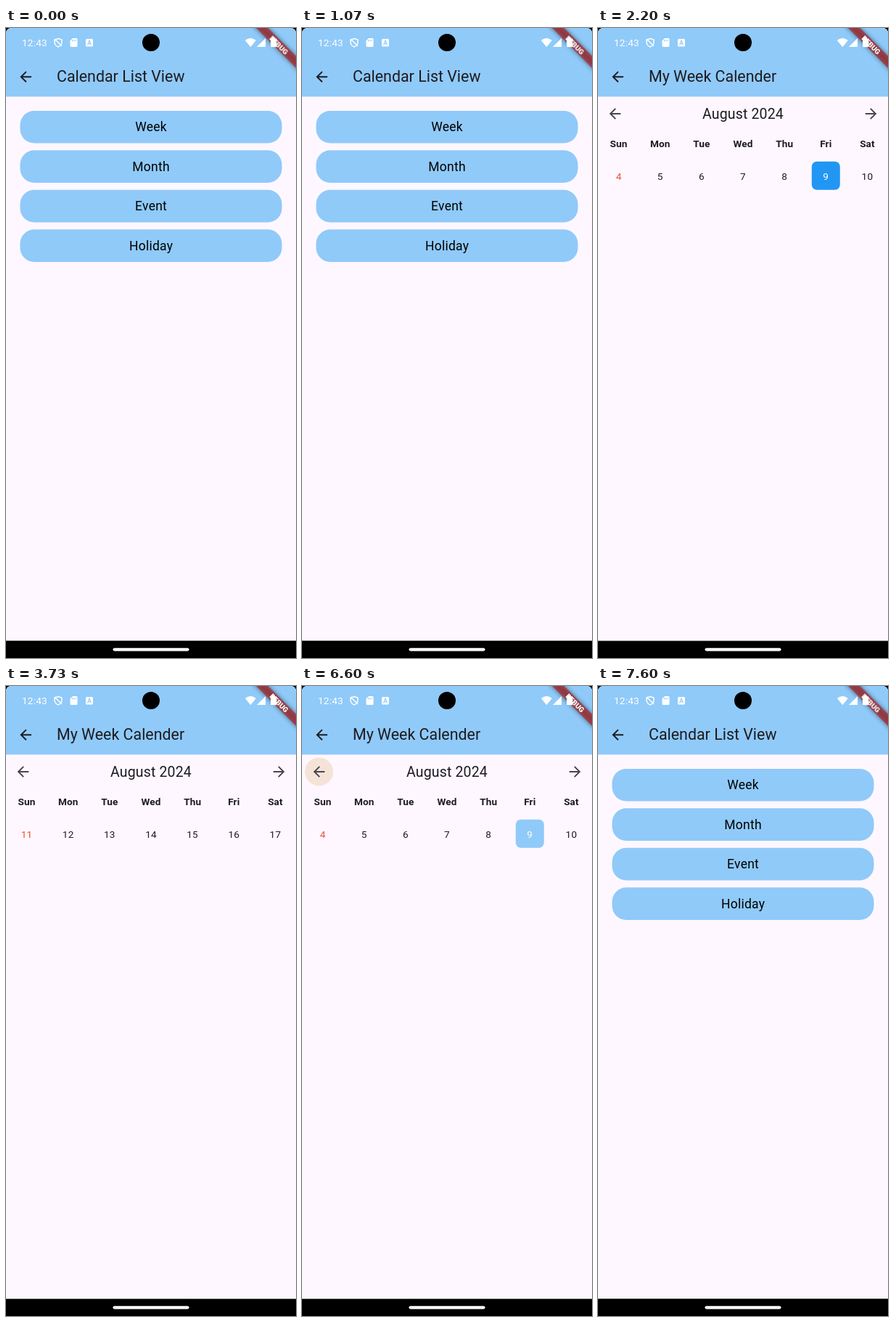
An HTML page that plays this animation: 400x867 px, repeating every 8000 ms.

```html
<!DOCTYPE html>
<html lang="en">
<head>
<meta charset="utf-8">
<title>Calendar list</title>
<style>
  html, body { margin: 0; width: 100%; height: 100%; overflow: hidden; background: #000; }
  svg { display: block; width: 100vw; height: 100vh; }
  text { font-family: Roboto, "Noto Sans", sans-serif; fill: #1d1b20; }
  .mid { text-anchor: middle; }
  .title { font-size: 21.4px; }
  .label { font-size: 17.5px; letter-spacing: .24px; fill: #000; }
  .month { font-size: 19.5px; letter-spacing: .15px; }
  .day { font-size: 13.6px; font-weight: 700; letter-spacing: .1px; }
  .date { font-size: 13.6px; letter-spacing: .2px; }
  .sun { fill: #f04c36; }
  .on, .white { fill: #fff; }
</style>
</head>
<body>
<svg id="stage" viewBox="0 0 400 867">
  <defs>
    <path id="arrow" transform="scale(.973) translate(-12 -12)"
      d="M20 11H7.83l5.59-5.59L12 4l-8 8 8 8 1.41-1.41L7.83 13H20z"/>
    <filter id="soft" x="-20%" y="-100%" width="140%" height="300%"><feGaussianBlur stdDeviation="3"/></filter>
    <clipPath id="app"><path d="M0 843.330V8Q0 0 8 0H392Q400 0 400 8V843.330Z"/></clipPath>
  </defs>
  <rect width="400" height="867"/>
  <g clip-path="url(#app)">
    <g id="list"></g>
    <rect id="scrim" width="400" height="844" opacity="0"/>
    <g id="week"></g>
    <g transform="translate(400 0) rotate(45)">
      <rect x="-48" y="27.2" width="96" height="11.7" opacity=".5" filter="url(#soft)"/>
      <rect x="-48" y="27.2" width="96" height="11.7" fill="#b71c1c" opacity=".63"/>
      <text class="mid white" y="36.6" font-size="9.9" font-weight="900">DEBUG</text>
    </g>
  </g>
  <circle cx="200" cy="20" r="12"/>
  <g fill="#fff">
    <text class="white" x="22" y="25" font-size="13.6" letter-spacing=".2">12:43</text>
    <path d="M72 14.5L77 16.3V20Q76.5 24 72 26Q67.5 24 67 20V16.3ZM67 15L77 25" fill="none" stroke="#fff" stroke-width="1.5"/>
    <path d="M92 14H97Q98.5 14 98.5 15.5V24.5Q98.5 26 97 26H90Q88.5 26 88.5 24.5V17.5Z"/>
    <path d="M91.5 16V18.5M93.7 16V18.5M95.9 16V18.5" stroke="#90caf9"/>
    <rect x="110" y="15" width="10" height="10.5" rx="1.5"/>
    <path d="M112.5 23.5L115 17L117.5 23.5M113.5 21.5H116.5" fill="none" stroke="#90caf9" stroke-width="1.1"/>
    <path d="M329.8 17Q337.3 11 344.8 17L337.3 26.3Z"/>
    <path d="M346 26L358 14V26Z"/>
    <path d="M367 14.3V13H371V14.3H372.3Q373.3 14.3 373.3 15.3V25Q373.3 26.2 372.3 26.2H366Q365 26.2 365 25V15.3Q365 14.3 366 14.3Z"/>
  </g>
  <rect x="147.5" y="853.2" width="105" height="4.2" rx="2.1" fill="#fff"/>
</svg>
<script>
const LOOP = 8000, SKY = '#90caf9', BLUE = '#2196f3', PAPER = '#fef7ff', TAP = '#f5e3d8';
const OPEN = 1695, CLOSE = 7260, ROUTE = 300;
const NEXT = 2800, PREV = 5900, SLIDE = 300;

const $ = id => document.getElementById(id);
const clamp = v => Math.max(0, Math.min(1, v));
const part = (v, from, to) => clamp((v - from) / (to - from));
const mix = (a, b, p) => a + (b - a) * p;
const set = (id, name, value) => $(id).setAttribute(name, value);

function bezier(x1, y1, x2, y2) {
  const at = (a, b, u) => 3 * (1 - u) * (1 - u) * u * a + 3 * (1 - u) * u * u * b + u * u * u;
  return x => {
    if (x <= 0 || x >= 1) return clamp(x);
    let lo = 0, hi = 1;
    for (let i = 0; i < 22; i++) {
      const u = (lo + hi) / 2;
      if (at(x1, x2, u) < x) lo = u; else hi = u;
    }
    return at(y1, y2, lo);
  };
}
const ease = bezier(.42, 0, .58, 1);
const rise = bezier(.05, 0, .133333, .06);
const settle = bezier(.208333, .82, .25, 1);
const zoom = p => p < 1 / 6 ? .4 * rise(p * 6) : .4 + .6 * settle((p - 1 / 6) * 1.2);

const text = (cls, x, y, str) => `<text class="${cls}" x="${x}" y="${y}">${str}</text>`;
const arrow = (x, y, fill, flip = 1) =>
  `<g transform="translate(${x} ${y}) scale(${flip} 1)"><use href="#arrow" fill="${fill}"/></g>`;
const screen = title => `<rect width="400" height="844" fill="${PAPER}"/>`
  + `<rect width="400" height="94.450" fill="${SKY}"/>`
  + arrow(27.2, 67.2, '#1d1b20') + text('title', 70, 74.4, title);
const splash = (id, x) => `<circle id="${id}" cx="${x}" cy="118" r="19.5" fill="${TAP}"/>`;
const column = i => (400 / 7 * (i + .5)).toFixed(2);

function dates(first, dx) {
  let out = `<g transform="translate(${dx} 0)">`;
  for (let i = 0; i < 7; i++) {
    const n = first + i;
    if (n === 9) out += '<rect id="today" x="294.8" y="183.7" width="39" height="39" rx="7"/>';
    out += text('mid date' + (i ? '' : ' sun') + (n === 9 ? ' on' : ''), column(i), 208.5, n);
  }
  return out + '</g>';
}

$('list').innerHTML = screen('Calendar List View')
  + ['Week', 'Month', 'Event', 'Holiday'].map((name, i) => {
    const y = 113.9 + i * 54.45;
    return `<rect x="19.45" y="${y}" width="361.1" height="44.7" rx="19.5" fill="${SKY}"/>`
      + text('mid label', 200.1, y + 28.4, name);
  }).join('');

$('week').innerHTML = screen('My Week Calender')
  + splash('tapL', 23.5) + splash('tapR', 376.5)
  + arrow(23.5, 118, '#49454f') + arrow(376.5, 118, '#49454f', -1)
  + text('mid month', 200, 125, 'August 2024')
  + ['Sun', 'Mon', 'Tue', 'Wed', 'Thu', 'Fri', 'Sat'].map((d, i) => text('mid day', column(i), 164, d)).join('')
  + '<g id="pages">' + dates(4, 0) + dates(11, 400) + '</g>';

const scaled = s => `translate(200 421.67) scale(${s}) translate(-200 -421.67)`;
const pulse = (t, at, hold) => part(t, at - 40, at + 60) * (1 - part(t, at + hold, at + hold + 250));

function render(t) {
  const open = part(t, OPEN, OPEN + ROUTE), close = part(t, CLOSE, CLOSE + ROUTE);
  const back = t >= CLOSE;
  const under = back ? mix(1.1, 1, zoom(close)) : mix(1, 1.05, zoom(open));
  const over = back ? mix(1, .9, zoom(close)) : mix(.85, 1, zoom(open));
  const fade = back ? 1 - part(close, .0825, .2075) : part(open, .125, .25);
  set('list', 'transform', scaled(under));
  set('week', 'transform', scaled(over));
  set('week', 'opacity', fade);
  set('scrim', 'opacity', back ? 0 : .6 * part(open, .2075, .4175));

  const page = ease(part(t, NEXT, NEXT + SLIDE)) - ease(part(t, PREV, PREV + SLIDE));
  set('pages', 'transform', `translate(${-400 * page} 0)`);
  set('today', 'fill', t < NEXT + SLIDE ? BLUE : SKY);
  set('tapR', 'opacity', pulse(t, NEXT, 450));
  set('tapL', 'opacity', pulse(t, PREV, 720));
}

const start = performance.now();
function tick() {
  render((performance.now() - start) % LOOP);
  requestAnimationFrame(tick);
}
tick();
</script>
</body>
</html>
```
